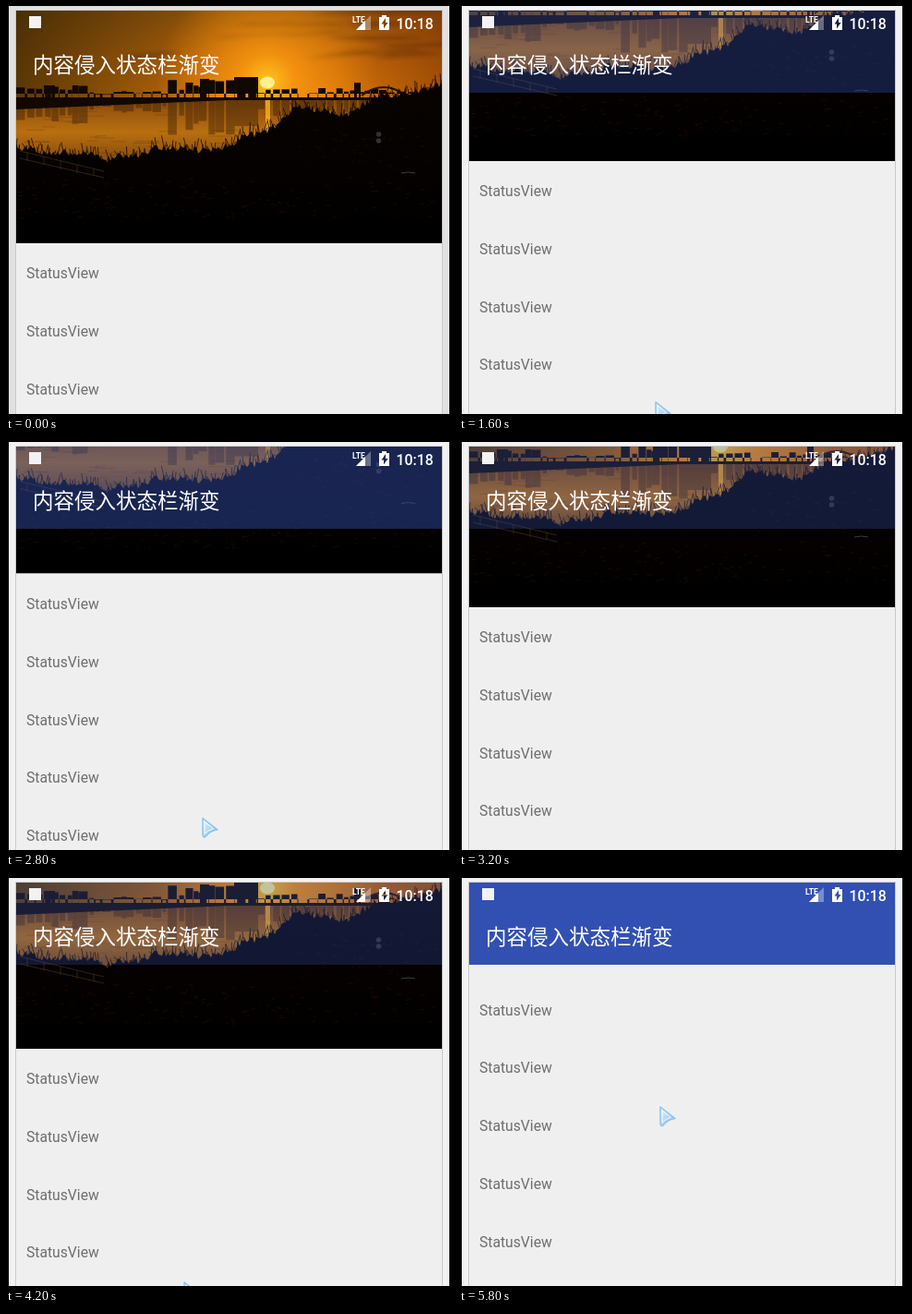
Write an HTML page that moves like this. It is 484 px wide and 442 px high and loops after 6 s.

```html
<!DOCTYPE html>
<html lang="zh-CN">
<head>
<meta charset="utf-8">
<title>Fading status bar</title>
<style>
@property --s { syntax: "<number>"; inherits: true; initial-value: 0; }
@property --x { syntax: "<number>"; inherits: true; initial-value: 212; }
@property --o { syntax: "<number>"; inherits: true; initial-value: 517; }

html, body { margin: 0; width: 100%; height: 100%; overflow: hidden; background: #000; }

/* --s: scroll offset, --x: pointer x, --o: pointer y at zero scroll */
.stage {
  position: relative; width: 484px; height: 442px; overflow: hidden;
  background: linear-gradient(90deg, #000 3px, transparent 3px 480px, #000 480px) #f2f2f2;
  animation: drag 6s -5ms infinite, edge 6s -5ms step-end infinite;
}
@keyframes drag {
  0%, 10%       { --s: 0;   --x: 212; --o: 517; animation-timing-function: steps(5); }
  26.67%        { --s: 89;  --x: 212; --o: 517; animation-timing-function: steps(4); }
  40%           { --s: 151; --x: 212; --o: 517; animation-timing-function: steps(4); }
  53.33%        { --s: 78;  --x: 212; --o: 525; animation-timing-function: steps(2); }
  60%           { --s: 42;  --x: 192; --o: 525; animation-timing-function: steps(3); }
  70%           { --s: 72;  --x: 192; --o: 509; animation-timing-function: steps(4); }
  83.33%        { --s: 198; --x: 192; --o: 513; animation-timing-function: steps(2); }
  90%           { --s: 252; --x: 205; --o: 516; animation-timing-function: steps(2); }
  96.67%, 100%  { --s: 272; --x: 217; --o: 519; }
}
@keyframes edge {
  0%     { background-color: #e1e1e1; }
  13.33% { background-color: #f2f2f2; }
}

.screen {
  position: absolute; left: 11px; top: 5px; width: 461px; height: 437px;
  overflow: hidden; background: #efefef; box-shadow: 0 0 0 1px #c9c9c9;
}
.scroll { transform: translateY(calc(var(--s) * -1px)); }
.photo { display: block; }
ul { margin: 0; padding: 0; list-style: none; }
li {
  height: 62.8px; padding-left: 11px;
  font: 15.7px/65.2px Roboto, sans-serif; color: #6e6e6e;
}
.bar {
  position: absolute; left: 0; top: 0; width: 461px; height: 89px;
  background: #3250b1; opacity: calc(var(--s) / 252);
}
.title {
  position: absolute; left: 18px; top: 40px; white-space: nowrap; color: #fff;
  font: 22.5px/34px "Noto Sans CJK SC", "Noto Sans CJK", sans-serif;
}
.icons { position: absolute; left: 0; top: 0; }
.icons text { fill: #fff; font-family: Roboto, sans-serif; }
.pointer {
  position: absolute; left: 0; top: 0;
  transform: translate(calc(var(--x) * 1px), calc((var(--o) - var(--s)) * 1px));
}
</style>
</head>
<body>
<div class="stage">
  <div class="screen">
    <div class="scroll">
      <svg class="photo" width="461" height="252">
        <defs>
          <linearGradient id="sky" x2="0" y2="1">
            <stop offset="0" stop-color="#9c5a0c"/>
            <stop offset=".5" stop-color="#c86c0a"/>
            <stop offset="1" stop-color="#e07c08"/>
          </linearGradient>
          <radialGradient id="glow" gradientUnits="userSpaceOnUse" cx="272" cy="77" r="120">
            <stop offset="0" stop-color="#ffc820"/>
            <stop offset=".25" stop-color="#ff9c10" stop-opacity=".8"/>
            <stop offset="1" stop-color="#f08808" stop-opacity="0"/>
          </radialGradient>
          <linearGradient id="dusk">
            <stop offset="0" stop-color="#241c04" stop-opacity=".7"/>
            <stop offset=".5" stop-color="#241c04" stop-opacity=".1"/>
            <stop offset=".75" stop-color="#501400" stop-opacity=".05"/>
            <stop offset="1" stop-color="#501400" stop-opacity=".4"/>
          </linearGradient>
          <linearGradient id="lake" x2="0" y2="1">
            <stop offset="0" stop-color="#8a4c0c"/>
            <stop offset=".5" stop-color="#b86f10"/>
            <stop offset="1" stop-color="#7c460c"/>
          </linearGradient>
          <linearGradient id="land" x2="0" y2="1">
            <stop offset="0" stop-color="#080301"/>
            <stop offset=".6" stop-color="#040100"/>
            <stop offset="1" stop-color="#000"/>
          </linearGradient>
          <filter id="soft"><feGaussianBlur stdDeviation="7 2"/></filter>
        </defs>
        <rect width="461" height="98" fill="url(#sky)"/>
        <path id="clouds" stroke="#4a2404" stroke-opacity=".4" stroke-width="4" filter="url(#soft)"/>
        <rect width="461" height="98" fill="url(#dusk)"/>
        <rect width="461" height="98" fill="url(#glow)"/>
        <ellipse cx="272" cy="78" rx="8" ry="6.5" fill="#fff08c"/>
        <rect y="97" width="461" height="70" fill="url(#lake)"/>
        <path id="mirror" fill="#301804" fill-opacity=".4"/>
        <path id="ripples" stroke="#5c3410" stroke-opacity=".3"/>
        <path d="M270 97h5v33h-5z" fill="#ffb020" fill-opacity=".85"/>
        <path id="town" fill="#120802"/>
        <path d="M374 92q24-18 48 0" fill="none" stroke="#2a1206" stroke-width="2"/>
        <path id="reeds" stroke="#140802" stroke-opacity=".75"/>
        <path id="shore" fill="url(#land)"/>
        <path id="twigs" stroke="#240c04" stroke-opacity=".7"/>
        <path d="M4 152L95 174M4 160L95 181M12 154v9M30 158v9M48 163v9M66 167v9M84 171v8" fill="none" stroke="#5a3c18" stroke-opacity=".55"/>
        <path d="M417 176q8-2 15 0" fill="none" stroke="#3c3c34"/>
        <g fill="#505050" fill-opacity=".6">
          <circle cx="392.5" cy="134" r="2.800"/><circle cx="392.5" cy="141" r="2.800"/>
        </g>
      </svg>
      <ul></ul>
    </div>
    <div class="bar"></div>
    <svg class="icons" width="461" height="30">
      <rect x="14" y="6" width="13" height="13" fill="#f2f2f2"/>
      <text x="364" y="12.500" font-size="8.500" font-weight="700">LTE</text>
      <path d="M384 5v16h-16z" fill="#fff" fill-opacity=".35"/>
      <path d="M378 11v10h-10z" fill="#fff"/>
      <path d="M396 5h5v2h3v14h-11v-14h3zM400 8l-4.500 6.500h2.500v5l4.500-6.500h-2.500z" fill="#fff" fill-rule="evenodd"/>
      <text x="411.500" y="19.500" font-size="15.900" font-weight="500">10:18</text>
    </svg>
    <div class="title">内容侵入状态栏渐变</div>
  </div>
  <svg class="pointer" width="20" height="24">
    <defs>
      <linearGradient id="glass" x2="1" y2="1">
        <stop offset="0" stop-color="#e4f4ff"/>
        <stop offset="1" stop-color="#7fbcf0"/>
      </linearGradient>
    </defs>
    <path d="M1 1L17 13.500Q9 14.500 4 21Q1 22.500 1 19z" fill="url(#glass)" stroke="#8cc2ee" stroke-width="1.400" stroke-linejoin="round"/>
    <path d="M3 5L12.500 12.500Q7 13.500 3 18z" fill="none" stroke="#fff" stroke-opacity=".8"/>
  </svg>
</div>
<script>
let seed = 7;
const rnd = (a, b) => {
  seed = seed * 16807 % 2147483647;
  return a + (b - a) * seed / 2147483647;
};
const draw = (id, d) => document.getElementById(id).setAttribute('d', d);
const repeat = (n, part) => Array.from({ length: n }, (_, i) => part(i)).join('');

draw('clouds', repeat(16, () => `M${rnd(120, 420)} ${rnd(0, 55)}l${rnd(30, 110)} ${rnd(-8, 4)}`));

// Skyline on its dark bank, with blurred columns below it in the water
let town = 'M0 107L90 103L230 97H461V90H0z';
let mirror = '';
for (let x = 0; x < 440;) {
  const w = rnd(4, 10);
  const top = x < 70 ? rnd(80, 87) : x < 160 ? rnd(87, 91) : x < 235 ? rnd(75, 86) : rnd(83, 90);
  town += `M${x} 94V${top}h${w}V94z`;
  mirror += `M${x} 97h${w}v${(94 - top) * 2}h${-w}z`;
  x += w + rnd(0, 3);
}
town += 'M236 94V72h26v22zM199 94V74h10v20zM30 94V81h12v13zM366 94V78h7v16z';
draw('town', town);
draw('mirror', mirror + 'M236 97h26v28h-26z');

draw('ripples', repeat(60, () => `M${rnd(0, 380)} ${rnd(102, 160)}h${rnd(6, 30)}`));

// Bushes: a rough edge through a few points, with loose reeds above it
const edge = [[0, 146], [20, 150], [45, 153], [75, 154], [100, 160], [112, 154], [130, 157],
  [152, 147], [185, 148], [205, 152], [234, 143], [250, 133], [270, 132], [287, 117], [301, 103],
  [322, 106], [342, 111], [364, 110], [380, 99], [395, 88], [411, 93], [432, 85], [461, 80]];
let shore = 'M0 252';
let reeds = '';
for (let i = 1; i < edge.length; i++) {
  const [x0, y0] = edge[i - 1], [x1, y1] = edge[i];
  for (let x = x0; x < x1; x += 2) {
    const y = y0 + (y1 - y0) * (x - x0) / (x1 - x0) + rnd(-3, 5);
    shore += `L${x} ${y}`;
    reeds += `M${x} ${y + 3}l${rnd(-4, 4)} ${rnd(-13, -3)}`;
  }
}
draw('shore', shore + 'L461 80V252z');
draw('reeds', reeds);

draw('twigs', repeat(190, () => {
  const x = rnd(0, 455);
  return `M${x} ${rnd(x > 290 ? 125 : 182, 225)}l${rnd(1, 6)} ${rnd(-2, 2)}`;
}));

document.querySelector('ul').innerHTML = repeat(9, () => '<li>StatusView</li>');
</script>
</body>
</html>
```
